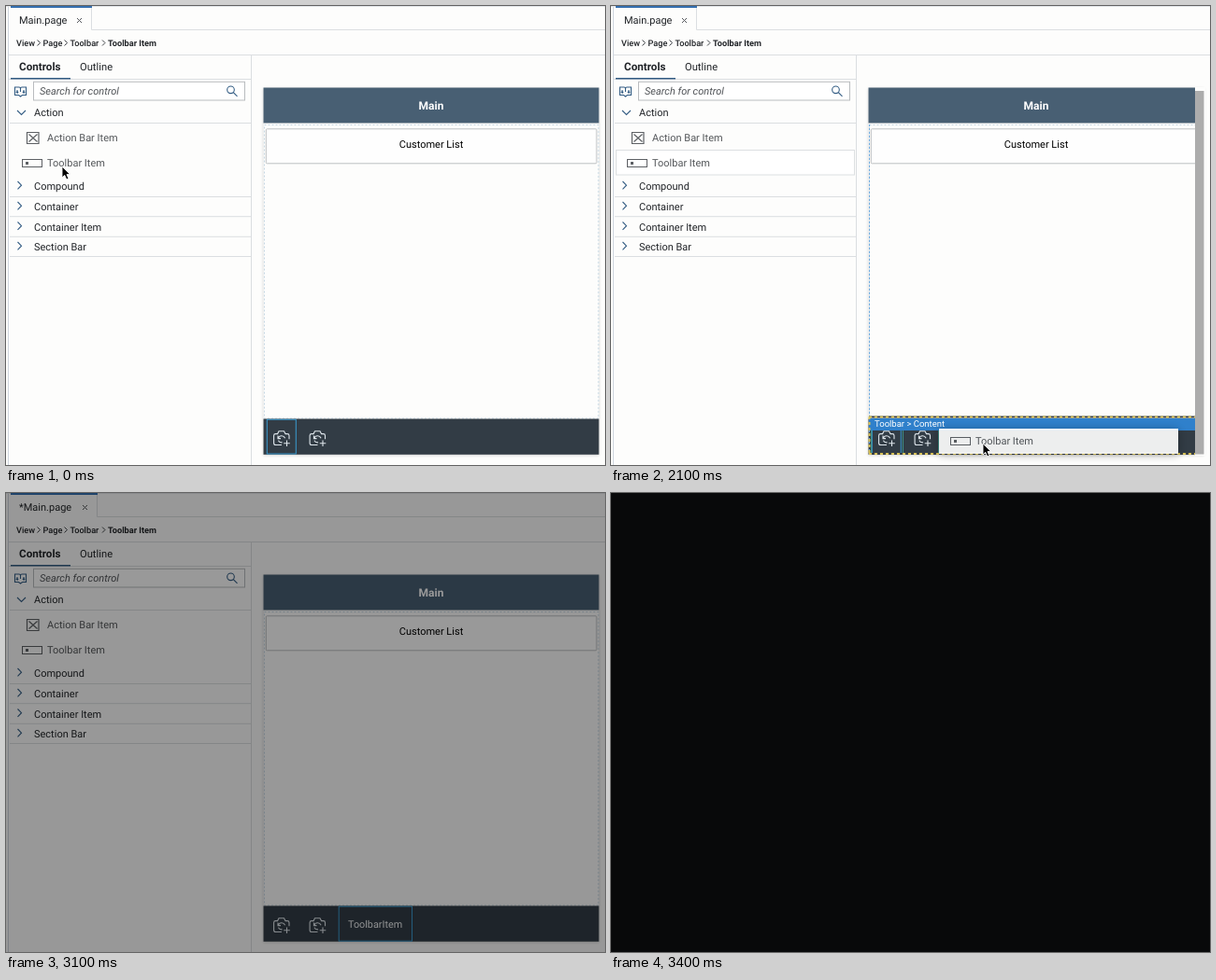
An HTML page that plays this animation: 641x492 px, repeating every 3500 ms.

```html
<!DOCTYPE html>
<html lang="en">
<head>
<meta charset="utf-8">
<title>Drag a toolbar item</title>
<style>
  html, body { margin: 0; width: 100%; height: 100%; overflow: hidden; background: #fdfdfc; }
  svg { display: block; width: 641px; height: 492px; font: 11px Roboto, "Open Sans", sans-serif; fill: #202327; }
  .bold { font-weight: 700; }
  .muted { fill: #54575a; }
  .crumb { font-size: 9.2px; font-weight: 500; }
  .rule { fill: none; stroke: #dbdee1; }
  .stroke { fill: none; stroke: #345d84; stroke-width: 1.1; }
  .icon { fill: none; stroke: #5d6064; }
  .camera { fill: none; stroke: #dfe6ec; stroke-width: 1.1; }
  .dots { fill: none; stroke: #c6d7e3; stroke-dasharray: 2 2; }
  .cell { fill: none; stroke: #3a9bd0; }

  .before, .after, .hover, .help, .hand, .arrow, .drag, .drop-zone, .ghost, .pointer, .fade {
    animation: 3.5s step-end infinite;
  }
  .before { animation-name: before; }
  .after { animation-name: after; }
  .hover { animation-name: hover; }
  .help, .hand { animation-name: hand; }
  .arrow { animation-name: arrow; }
  .drag { animation-name: drag; }
  .drop-zone { animation-name: drop-zone; }
  .ghost { animation-name: ghost; filter: drop-shadow(0 1px 5px #0005); }
  .pointer { animation-name: pointer; }
  .fade { animation-name: fade; }

  @keyframes before { 0% { opacity: 1 } 62.85%, 100% { opacity: 0 } }
  @keyframes after { 0% { opacity: 0 } 62.85%, 100% { opacity: 1 } }
  @keyframes hover { 0% { opacity: 0 } 2.85% { opacity: 1 } 62.85%, 100% { opacity: 0 } }
  @keyframes hand { 0% { opacity: 0 } 2.85% { opacity: 1 } 28.57%, 100% { opacity: 0 } }
  @keyframes arrow { 0% { opacity: 1 } 2.85% { opacity: 0 } 28.57% { opacity: 1 } 62.85%, 100% { opacity: 0 } }
  @keyframes drag { 0% { opacity: 0 } 28.57% { opacity: 1 } 62.85%, 100% { opacity: 0 } }
  @keyframes drop-zone { 0% { opacity: 0 } 42.85% { opacity: 1 } 62.85%, 100% { opacity: 0 } }
  @keyframes ghost {
    0% { opacity: 0; transform: translate(5px, 155px) }
    28.57% { opacity: .93; transform: translate(8px, 157px) }
    31.42% { opacity: .93; transform: translate(14px, 162px) }
    34.28% { opacity: .93; transform: translate(40px, 185px) }
    37.14% { opacity: .93; transform: translate(165px, 280px) }
    40% { opacity: .93; transform: translate(307px, 381px) }
    42.85% { opacity: .93; transform: translate(355px, 442px) }
    45.71% { opacity: .93; transform: translate(358px, 449px) }
    51.42% { opacity: .93; transform: translate(354px, 452px) }
    57.14% { opacity: .93; transform: translate(351px, 453px) }
    62.85%, 100% { opacity: 0; transform: translate(351px, 453px) }
  }
  @keyframes pointer {
    0% { transform: translate(60px, 172px) }
    31.42% { transform: translate(68px, 180px) }
    34.28% { transform: translate(120px, 222px) }
    37.14% { transform: translate(270px, 345px) }
    40% { transform: translate(410px, 463px) }
    45.71% { transform: translate(408px, 467px) }
    51.42% { transform: translate(402px, 468px) }
    57.14%, 100% { transform: translate(398px, 469px) }
  }
  @keyframes fade {
    0% { opacity: 0; fill: #000 } 85.71% { opacity: .2; fill: #000 } 88.57% { opacity: .4; fill: #000 }
    91.42% { opacity: .6; fill: #000 } 94.28% { opacity: .8; fill: #000 }
    97.14%, 100% { opacity: 1; fill: #08090a }
  }
</style>
</head>
<body>
<svg viewBox="0 0 641 492" text-rendering="geometricPrecision">
  <defs>
    <g id="camera" class="camera">
      <path d="M9 15.5H2.5Q.6 15.5 .6 13.6V5.4Q.6 3.6 2.5 3.6H4.6L6 .8H11.5L13 3.6H15Q17 3.6 17 5.4V9.3M12.6 8.2A4 4 0 0 0 5.2 8.4M5 5.6V8.6H8M5.4 10.7A4 4 0 0 0 9.6 12.8M14.5 10.4V17M11.2 13.7H17.8"/>
    </g>
    <g id="item">
      <rect x="12.5" y="9.5" width="21" height="8" class="icon"/>
      <rect x="16" y="12" width="3" height="3" fill="#5d6064"/>
      <text x="39" y="17" class="muted">Toolbar Item</text>
    </g>
    <path id="chevron" class="stroke" d="M.5 0L4.500 4.200L.5 8.400"/>
    <path id="close" d="M-2.5 -2.5L2.5 2.5M2.5 -2.5L-2.5 2.5" stroke="#55585c"/>
  </defs>

  <rect width="641" height="492" fill="#fdfdfc"/>
  <path d="M2.5 0V492" stroke="#cfd6de"/>
  <rect width="641" height="1" fill="#e3e6e9"/>

  <!-- file tab -->
  <g class="before">
    <rect x="5" width="87" height="2" fill="#346fb0"/>
    <path d="M91.5 2V25.5H641" class="rule"/>
    <text x="14" y="18.7">Main.page</text>
    <use href="#close" x="78.5" y="15.5"/>
  </g>
  <g class="after">
    <rect x="5" width="93" height="2" fill="#346fb0"/>
    <path d="M97.5 2V25.5H641" class="rule"/>
    <text x="14" y="18.7">*Main.page</text>
    <use href="#close" x="84.5" y="15.5"/>
  </g>

  <!-- breadcrumb -->
  <g class="crumb">
    <text x="11" y="42.5">View</text>
    <text x="39.5" y="42.5">Page</text>
    <text x="68.5" y="42.5">Toolbar</text>
    <text x="109" y="42.5" class="bold">Toolbar Item</text>
    <path d="M33.5 36.5L36.5 39.5L33.5 42.5M62.5 36.5L65.5 39.5L62.5 42.5M103 36.5L106 39.5L103 42.5" fill="none" stroke="#3f4347"/>
  </g>
  <path d="M3 52.5H641M262.5 53V492M3 78.5H262" class="rule"/>

  <!-- controls panel -->
  <text x="14" y="69" font-size="11.7" class="bold">Controls</text>
  <text x="79" y="69" font-size="11.2">Outline</text>
  <rect x="5" y="77" width="64" height="1.5" fill="#345d84"/>
  <path class="stroke" d="M9.5 87H14Q15.5 87 15.5 88.5Q15.5 87 17 87H21.5V95.5H17.5L15.5 97L13.5 95.5H9.5ZM15.5 88.5V92M12 90V93L10.8 92M12 93L13.2 92M19 90V93L17.8 92M19 93L20.2 92"/>
  <rect x="29.500" y="81.3" width="226" height="19.700" fill="#fff" stroke="#b9bcbf"/>
  <text x="36" y="95" font-style="italic" fill="#505357">Search for control</text>
  <g class="stroke">
    <circle cx="240.5" cy="89.8" r="3.8"/><path d="M243.3 92.6L247.5 96.8"/>
  </g>

  <path class="stroke" d="M12 112L16.5 116.5L21 112"/>
  <text x="30" y="118">Action</text>
  <path class="icon" d="M22.5 135.5H35V147.5H22.5ZM24.5 137.5L33.5 145.5M33.5 137.5L24.5 145.5" stroke-width="1.2"/>
  <text x="44" y="144.600" class="muted">Action Bar Item</text>
  <g class="hover">
    <rect x="5.5" y="154.5" width="255" height="26.500" fill="#fff" stroke="#dcdfe1"/>
  </g>
  <use href="#item" x="5" y="155"/>
  <g class="help">
    <circle cx="243.5" cy="168" r="4.6" class="icon"/>
    <text x="243.5" y="171" font-size="8" text-anchor="middle">?</text>
  </g>
  <use href="#chevron" x="12" y="188"/><text x="30" y="197">Compound</text>
  <use href="#chevron" x="12" y="210"/><text x="30" y="219">Container</text>
  <use href="#chevron" x="12" y="231.5"/><text x="30" y="240.700">Container Item</text>
  <use href="#chevron" x="12" y="253"/><text x="30" y="262">Section Bar</text>
  <path d="M4 125.5H262M4 204.5H262M4 225.7H262M4 247.3H262M4 268.5H262" class="rule"/>

  <!-- page canvas -->
  <rect x="275.5" y="87.5" width="359" height="393" fill="#fdfdfc" style="filter:drop-shadow(0 1px 1.5px #0003)"/>
  <rect x="275.5" y="87.5" width="359" height="38" fill="#485f73"/>
  <text x="455" y="111" font-size="12" class="bold" fill="#fff" text-anchor="middle">Main</text>
  <rect x="276.5" y="127.5" width="357.500" height="314.500" class="dots"/>
  <rect x="278.3" y="131.8" width="353.700" height="37" rx="1" fill="#fefefe" stroke="#bdc0c2"/>
  <text x="455" y="151.700" fill="#000" text-anchor="middle">Customer List</text>
  <rect x="275.5" y="442.5" width="359" height="38.300" fill="#323c45"/>
  <g class="before"><rect x="279.3" y="443.3" width="31" height="36.700" class="cell"/></g>
  <g class="after">
    <rect x="356.2" y="443.2" width="78.3" height="37" class="cell"/>
    <text x="366" y="466" font-size="10.8" fill="#f2f4f6">ToolbarItem</text>
  </g>
  <g class="drag">
    <path d="M276.5 127V480.5H634.5V127M276 442.5H634" class="dots" style="stroke:#70ace0"/>
  </g>

  <!-- drop target -->
  <g class="drop-zone">
    <rect x="625" y="87" width="11" height="395" fill="#fdfdfc"/>
    <rect x="625" y="91" width="9.5" height="389.5" fill="#acacac"/>
    <rect x="276" y="442" width="349" height="13" fill="#2f80cb"/>
    <text x="282" y="451.3" font-size="9.5" fill="#fff">Toolbar &gt; Content</text>
    <path d="M278.5 455V480M312.5 455V480M350.5 455V480" stroke="#3f8f86"/>
    <path d="M276 440.5H625M276 480H625" stroke="#3b4045" stroke-width="2"/>
    <path d="M276 440.5H625M276 480H625M276.5 440V480" stroke="#d8c35b" stroke-width="2" stroke-dasharray="3 3"/>
  </g>
  <use href="#camera" x="286" y="455"/>
  <use href="#camera" x="324.5" y="455"/>

  <g class="ghost">
    <rect width="256" height="27" fill="#fcfcfb"/>
    <use href="#item"/>
  </g>

  <g class="pointer" stroke="#fff" stroke-linejoin="round">
    <path class="arrow" d="M0 0V12L2.8 9.4L4.8 14L7 13L5 8.6H8.7Z" fill="#000" stroke-width=".9"/>
    <path class="hand" d="M-3 -7Q-1.5 -9 -.2 -7L.5 -3.8Q1.7 -5 2.8 -3.4Q4.4 -4.2 5.2 -2.2Q7 -1.8 6.600 .5L5.5 4V6.5H-1V4L-5.2 -.8Q-5.6 -3 -3.7 -2L-1.5 -.5Z" fill="#fff" stroke="#222"/>
  </g>

  <rect class="fade" width="641" height="492"/>
</svg>
</body>
</html>
```
